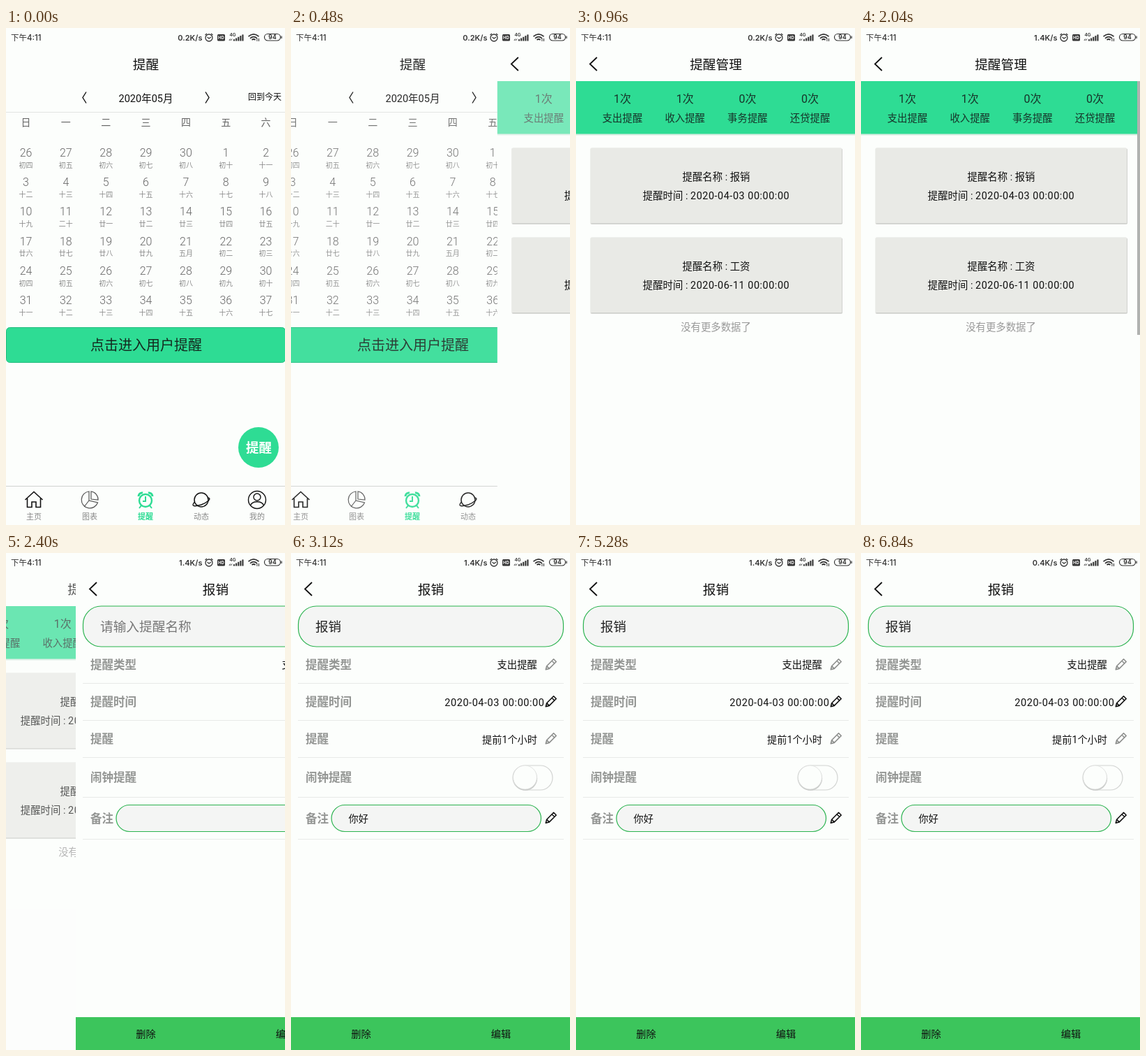
These frames come from a looping animation (400 by 711 pixels, 6.96 s). An HTML page:

```html
<!DOCTYPE html>
<html lang="zh-CN">
<head>
<meta charset="utf-8">
<title>提醒</title>
<style>
  html, body { margin: 0; width: 100%; height: 100%; overflow: hidden; background: #fcfefc; }
  svg { display: block; width: 400px; height: 711px; }
  text { font-family: Roboto, "Noto Sans CJK SC", "Noto Sans CJK JP", "Noto Sans CJK", sans-serif; }
  .status text { font-family: Inter, "Noto Sans CJK SC", "Noto Sans CJK JP", sans-serif; }
</style>
</head>
<body>
<svg id="stage" viewBox="0 0 400 711" xmlns="http://www.w3.org/2000/svg"></svg>
<script>
const GREEN = '#2edc94', PAPER = '#fcfefc', INK = '#111';
const LOOP = 6960, STEP = 120;

// Text placed by the middle of its line.
const txt = (x, cy, s, size, fill = INK, anchor = 'middle', weight = 400) =>
  `<text x="${x}" y="${(cy + size * 0.37).toFixed(2)}" font-size="${size}" fill="${fill}" text-anchor="${anchor}" font-weight="${weight}">${s}</text>`;
const rect = (x, y, w, h, fill, more = '') =>
  `<rect x="${x}" y="${y}" width="${w}" height="${h}" fill="${fill}" ${more}/>`;
const line = (d, color = INK, width = 1, more = '') =>
  `<path d="${d}" fill="none" stroke="${color}" stroke-width="${width}" ${more}/>`;
const ring = (x, y, r, color, width, fill = 'none') =>
  `<circle cx="${x}" cy="${y}" r="${r}" fill="${fill}" stroke="${color}" stroke-width="${width}"/>`;
const group = (id, body) => `<g id="${id}">${body}</g>`;
const page = (id, body) => group(id, rect(0, 0, 400, 711, PAPER) + body);
const title = s => txt(200.5, 52, s, 18.7, INK, 'middle', 500);
const back = line('M30 42L20 51.5L30 61', INK, 1.8);
const dated = s => `<tspan letter-spacing="0.55">${s}</tspan>`;

function calendar() {
  const colX = i => 28.5 + 57.35 * i;
  const days = [26, 27, 28, 29, 30, ...Array.from({ length: 37 }, (_, i) => i + 1)];
  const lunar = ('初四 初五 初六 初七 初八 初十 十一 十二 十三 十四 十五 十六 十七 十八 ' +
    '十九 二十 廿一 廿二 廿三 廿四 廿五 廿六 廿七 廿八 廿九 五月 初二 初三 ' +
    '初四 初五 初六 初七 初八 初九 初十 十一 十二 十三 十四 十五 十六 十七').split(' ');
  const week = [...'日一二三四五六'].map((d, i) => txt(colX(i), 135, d, 14, '#666')).join('');
  const cells = days.map((d, i) => {
    const x = colX(i % 7), y = 178 + 42.25 * Math.floor(i / 7);
    return txt(x, y, d, 16, '#666', 'middle', 300) + txt(x, y + 18, lunar[i], 10, '#888');
  }).join('');
  return page('cal', title('提醒') +
    line('M115 91.5L110 99.5L115 107.5M286 91.5L291 99.5L286 107.5', INK, 1.4) +
    txt(200.5, 101, '2020年05月', 14.5) + txt(395, 99, '回到今天', 12, INK, 'end') +
    line('M0 120.5H400', '#e2e4e2') + week + cells +
    rect(0.5, 428.5, 400, 50, GREEN, 'rx="5" stroke="#25bd80"') +
    txt(201, 453.5, '点击进入用户提醒', 20, '#14281e') +
    `<circle cx="362" cy="600" r="29" fill="${GREEN}"/>` +
    txt(362.5, 600, '提醒', 18.5, '#fff', 'middle', 700) + tabs());
}

function tabs() {
  const labels = ['主页', '图表', '提醒', '动态', '我的'].map((s, i) =>
    txt(40 + 80 * i, 699, s, 11, i === 2 ? GREEN : '#888', 'middle', i === 2 ? 700 : 400)).join('');
  const home = line('M27.5 675L40 663.5L52.5 675M30.5 673V685.5H37V678H43V685.5H49.5V673', INK, 1.6);
  const chart = line('M119 663A12 12 0 1 0 131.5 679L119 676Z', '#555', 1.2) +
    line('M119 676L112 685M122 663A11.5 11.5 0 0 1 132 675L122 674Z', '#555', 1.2);
  const clock = ring(200, 676, 9, GREEN, 2.4) +
    line('M200 670V677H196M194 683L191 687M206 683L209 687', GREEN, 2) +
    line('M190 670A5 5 0 0 1 196 665M210 670A5 5 0 0 0 204 665', GREEN, 3);
  const planet = ring(280, 675, 10, INK, 1.5) +
    line('M270.5 678C263 686 274 684 280 682C288 679 296 673 289.5 672', INK, 1.4);
  const me = ring(360, 675, 12.5, INK, 1.4) + ring(360, 671, 5, INK, 1.4) +
    line('M350.5 683C353 676 367 676 369.5 683', INK, 1.4);
  return line('M0 655.5H400', '#d0d2d0') + home + chart + clock + planet + me + labels;
}

function list() {
  const heads = ['支出', '收入', '事务', '还贷'].map((s, i) => {
    const x = 66.5 + 89.7 * i;
    return txt(x, 101, (i < 2 ? 1 : 0) + '次', 16, '#17352a') + txt(x, 129, s + '提醒', 14.4, '#17352a');
  }).join('');
  const card = (y, name, date) =>
    rect(20.5, y - 0.5, 361, 109.5, '#e2e3e0', 'rx="2"') + rect(21.5, y + 1, 360.5, 107.5, '#d0d1ce', 'rx="1"') +
    rect(21, y, 360, 107, '#e9eae6') +
    txt(201, y + 41, '提醒名称 : ' + name, 14.4) +
    txt(201, y + 68, '提醒时间 : ' + dated(date + ' 00:00:00'), 14.4);
  return page('list', back + title('提醒管理') +
    group('head', rect(0, 76, 400, 77.5, '#d5ebe0') + rect(0, 76, 400, 75.5, GREEN) + heads) +
    card(172, '报销', '2020-04-03') + card(300, '工资', '2020-06-11') +
    txt(200.5, 428, '没有更多数据了', 14.4, '#999') +
    group('bar', rect(396, 76, 4, 363, '#b0b2b0')));
}

function pencil(y, color) {
  return `<g transform="translate(372 ${y}) rotate(45)">` +
    line('M-2.6 -9H2.6V5L0 9.5L-2.6 5ZM-2.6 -5.5H2.6M-2.6 5H2.6', color, 1.6, 'stroke-linejoin="round"') + '</g>';
}

function detail() {
  const box = (x, y, w, h, r) => rect(x, y, w, h, '#f4f5f4', `rx="${r}" stroke="#2bb34f" stroke-width="1.2"`);
  const labels = [['提醒类型', 160], ['提醒时间', 213], ['提醒', 266], ['闹钟提醒', 321], ['备注', 379.5]]
    .map(([s, y]) => txt(21, y, s, 16.5, '#939593', 'start', 700)).join('');
  const rules = [186.5, 239.5, 292.5, 349.5, 409.5].map(y => line(`M10 ${y}H391`, '#e8eae8')).join('');
  const toggle = rect(318, 304, 57, 35, PAPER, 'rx="17.5" stroke="#d2d4d2" stroke-width="1.2"') +
    '<circle cx="336" cy="322.5" r="17.2" fill="#c9cbc9"/>' + ring(335.5, 321, 17, '#dcdedc', 0.8, PAPER);
  return page('detail', back + title('报销') + box(10.5, 76, 380, 58, 26) + labels + rules +
    txt(353, 160, '支出提醒', 14.4, INK, 'end') + toggle + box(58, 360.5, 300.5, 38, 19) +
    pencil(160, '#8c8e8c') + pencil(213, INK) + pencil(266, '#8c8e8c') + pencil(379.5, INK) +
    group('hint', txt(35, 105, '请输入提醒名称', 18.7, '#777', 'start')) +
    group('values', txt(35, 105, '报销', 18.5, '#222', 'start') +
      txt(363.5, 213.5, dated('2020-04-03 00:00:00'), 14.5, INK, 'end') +
      txt(353, 266.5, '提前1个小时', 14.2, INK, 'end') + txt(82.5, 380, '你好', 14.2, INK, 'start')) +
    rect(0, 664, 400, 47, '#3cc55c') + txt(100.5, 688, '删除', 14.2) + txt(301, 688, '编辑', 14.2));
}

function status() {
  const c = '#333';
  const bars = [0, 1, 2, 3, 4].map(i => rect(326 + i * 3.1, 16.2 - i * 1.7, 2.1, 2.3 + i * 1.7, c)).join('');
  const wifi = line('M347.5 12.2Q355 5.5 362.5 12.2M350 14.8Q355 10.5 360 14.8M352.5 17Q355 15 357.5 17', c, 1.7) +
    line('M360 15V19M362.5 19V15', c, 1);
  return `<g class="status">` + txt(7, 14, '下午4:11', 11.5, c, 'start', 500) +
    `<text id="speed" x="281.5" y="18" font-size="11" fill="${c}" text-anchor="end" font-weight="600"></text>` +
    ring(291, 14, 5, c, 1.3) + line('M288.5 13L291 15L294 13M285.5 10L288 8M296.5 10L294 8', c, 1.2) +
    rect(303, 9, 11, 9.5, c, 'rx="1.5"') + txt(308.5, 13.8, 'HD', 6, '#fff', 'middle', 700) +
    txt(325, 9.5, '4G', 6.5, c, 'middle', 600) + line('M320 18L321.5 15.5M322 18L324 15.5', c, 1) +
    bars + wifi + rect(370.5, 8.5, 23, 9.5, 'none', `rx="4.7" stroke="${c}" stroke-width="1.2"`) +
    rect(394.5, 11.5, 1.2, 3.5, c) + txt(382, 13.3, '94', 8.5, c, 'middle', 700) + '</g>';
}

document.getElementById('stage').innerHTML = calendar() + list() + detail() + status();
const el = {};
for (const id of ['cal', 'list', 'detail', 'head', 'bar', 'hint', 'values', 'speed'])
  el[id] = document.getElementById(id);

const clamp = v => Math.min(1, Math.max(0, v));
const slide = (t, start) => 1 - (1 - clamp((t - start) / 300)) ** 2;
const show = (node, on) => node.setAttribute('visibility', on ? 'visible' : 'hidden');

function place(node, x, opacity, on) {
  node.setAttribute('transform', `translate(${x.toFixed(2)} 0)`);
  node.setAttribute('opacity', opacity.toFixed(3));
  node.setAttribute('display', on ? 'inline' : 'none');
}

function draw(now) {
  const t = Math.floor((now % LOOP) / STEP) * STEP;
  const a = slide(t, 438), b = slide(t, 2250);
  place(el.cal, -100 * a, 1 - 0.4 * a, a < 1);
  place(el.list, 400 * (1 - a) - 100 * b, 1 - 0.4 * b, a > 0 && b < 1);
  place(el.detail, 400 * (1 - b), 1, b > 0);
  el.head.setAttribute('opacity', 0.63 + 0.37 * clamp((t - 720) / 240));
  show(el.bar, t >= 1560 && t < 2160);
  show(el.hint, t < 2640);
  show(el.values, t >= 2640);
  const speed = t < 1560 ? '0.2K/s' : t < 5640 ? '1.4K/s' : '0.4K/s';
  if (el.speed.textContent !== speed) el.speed.textContent = speed;
}

const begin = performance.now();
function tick() {
  draw(performance.now() - begin);
  requestAnimationFrame(tick);
}
tick();
</script>
</body>
</html>
```
